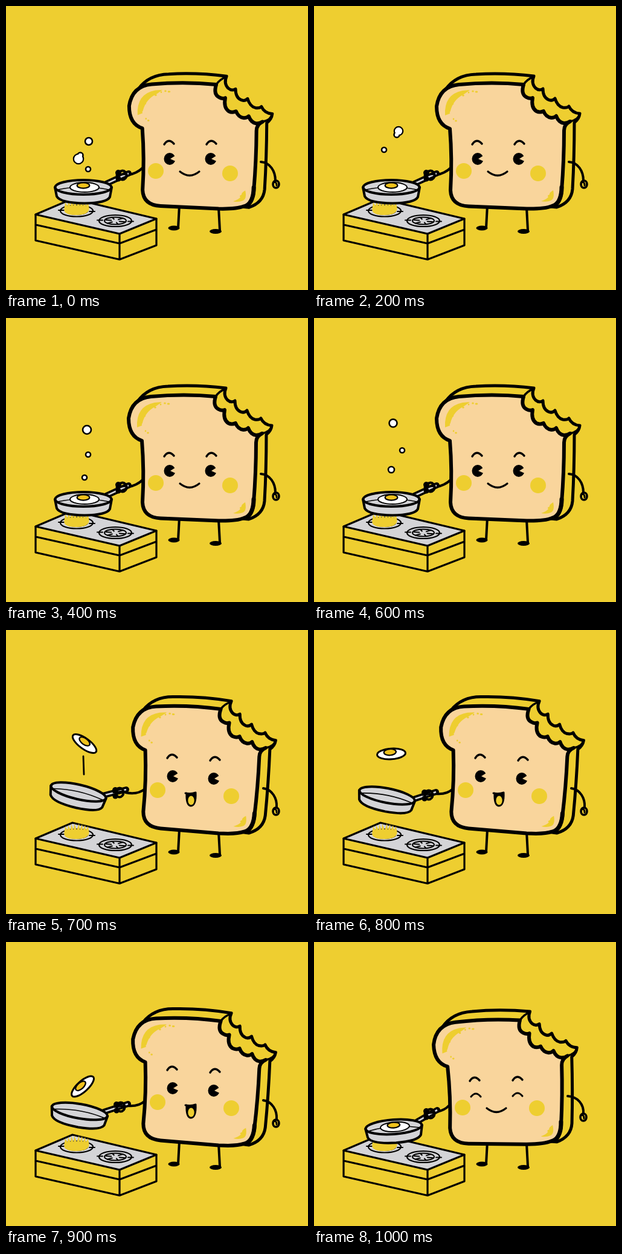
Write an HTML page that moves like this. It is 500x470 px and loops after 1.1 s.

```html
<!DOCTYPE html>
<html lang="en">
<head>
<meta charset="utf-8">
<title>Toast frying an egg</title>
<style>
  html, body { margin: 0; width: 100%; height: 100%; overflow: hidden; background: #eece30; }
  svg { display: block; width: 100%; height: 100%; }
  .line { fill: none; stroke: #000; stroke-linecap: round; stroke-linejoin: round; }
</style>
</head>
<body>
<svg id="stage" viewBox="0 0 500 470"></svg>
<script>
const YELLOW = '#eece30', BREAD = '#f9d59c', GREY = '#d4d4d7', YOLK = '#efc21c';
const LOOP = 1100;

const line = (d, w = 4, fill = 'none') =>
  `<path class="line" d="${d}" stroke-width="${w}" style="fill:${fill}"/>`;
const shape = (d, fill) => `<path d="${d}" fill="${fill}"/>`;
const oval = (x, y, rx, ry, fill, w = 0) =>
  `<ellipse cx="${x}" cy="${y}" rx="${rx}" ry="${ry}" fill="${fill}"` +
  (w ? ` stroke="#000" stroke-width="${w}"/>` : '/>');
const group = (transform, content) => `<g transform="${transform}">${content}</g>`;
const at = (x, y, r = 0) => `translate(${x} ${y}) rotate(${r})`;

// Poses: body tilt, face parts, pan position and tilt, handle, arms.
const idle = {
  tilt: 0, eyes: [[271, 253], [339, 253]], brows: [[270, 225], [340, 225]],
  cheeks: [[248, 273], [371, 277]], mouth: [304, 274], look: 'open',
  pan: [128, 300, 0], handle: [166, 294, 203, 277], hand: [190, 280],
  arm: 'M201 280 Q217 277 226 268',
  armR: 'M422 258 C437 259 446 273 446 289', fist: [447, 295]
};
const toss = {
  tilt: 2.4, eyes: [[276, 242], [344, 246]], brows: [[275, 208], [346, 212]],
  cheeks: [[251, 265], [373, 275]], mouth: [306, 270], look: 'happy',
  pan: [120, 268, 13], handle: [160, 274, 199, 264], hand: [185, 269],
  arm: 'M198 269 Q218 273 230 263',
  armR: 'M426 262 C441 264 449 279 448 293', fist: [447, 300]
};
const ready = {
  ...toss, pan: [122, 280, 10], handle: [162, 281, 202, 268], hand: [187, 273],
  arm: 'M201 271 Q219 273 230 263'
};
const smile = {
  tilt: -1.7, eyes: [[268, 253], [337, 252]], brows: [[266, 226], [337, 225]],
  cheeks: [[246, 274], [369, 275]], mouth: [302, 275], look: 'closed',
  pan: [132, 306, -4], handle: [171, 297, 204, 278], hand: [190, 284],
  arm: 'M204 281 Q217 278 223 271',
  armR: 'M420 255 C437 256 447 269 446 284', fist: [446, 290]
};

// Bubbles are [x, y, radius, bump direction].
const steps = [
  { t: 0, pose: { ...idle, tilt: .3 }, bubbles: [[137, 224, 6], [120, 253, 8, 1], [136, 270, 4]] },
  { t: 200, pose: idle, bubbles: [[140, 207, 7, -1], [116, 238, 4]] },
  { t: 300, pose: idle, bubbles: [[138, 196, 7], [126, 232, 4]] },
  { t: 400, pose: idle, bubbles: [[134, 185, 7], [136, 226, 4], [130, 264, 4]] },
  { t: 600, pose: idle, bubbles: [[131, 174, 6.5], [146, 219, 4], [128, 251, 5]] },
  { t: 700, pose: toss, egg: [130, 188, 36], trail: true },
  { t: 800, pose: { ...ready, pan: [121, 274, 11] }, egg: [128, 205, -4] },
  { t: 900, pose: ready, egg: [127, 239, -42] },
  { t: 1000, pose: smile }
];

const legs = () =>
  line('M287 330 L285 367') + oval(278, 367.5, 9.5, 4, '#000') +
  line('M352 334 L354 371') + oval(347, 373, 10, 4, '#000');

function burner(x, y) {
  let ticks = '';
  for (const a of [.3, 1.3, 2.4, 3.4, 4.4, 5.5]) {
    const c = Math.cos(a), s = Math.sin(a);
    ticks += line(`M${x + 7 * c} ${y + 3 * s} L${x + 17 * c} ${y + 6 * s}`, 2);
  }
  return oval(x, y, 27, 9.5, 'none', 2.2) + oval(x, y, 18, 6, 'none', 2) + ticks +
    line(`M${x - 30} ${y - 1} h9 M${x + 21} ${y + 1} h9`, 2);
}

function flame() {
  const n = 8;
  let d = 'M97 332';
  for (let i = 0; i < n; i++) {
    const x = 97 + i * 5;
    const peak = 326 - 6 * Math.sin((i + .5) / n * Math.PI);
    d += ` L${x + (i < n / 2 ? 1 : 4)} ${peak} L${x + 5} 331`;
  }
  return shape(d + ' Q141 346 116 346 Q92 346 97 332Z', YELLOW);
}

const stove = () =>
  shape('M49 345 L188 377 L249 352 V396 L188 419 L49 388Z', YELLOW) +
  line('M49 345 L110 319 L249 352 L188 377Z', 3.2, GREY) +
  line('M49 345 V388 L188 419.5 L249 396 V352 M188 377 V419 M49 362 L188 393 L249 370', 3.2) +
  burner(117, 339) + burner(181, 355.5) + flame();

function face(p) {
  const [[lx, ly], [rx, ry]] = p.eyes;
  const eye = (x, y) => p.look === 'closed'
    ? line(`M${x - 8} ${y + 3} Q${x} ${y - 7} ${x + 8} ${y + 3}`, 3)
    : oval(x, y, 9.5, 10, '#000') +
      shape(`M${x + 1} ${y} L${x + 12} ${y - 7} V${y + 5}Z`, BREAD);
  const brow = ([x, y]) => line(`M${x - 8} ${y + 4} Q${x - 1} ${y - 7} ${x + 8} ${y + 3}`, 3.4);
  const [mx, my] = p.mouth;
  const mouth = p.look === 'happy'
    ? line(`M${mx - 9} ${my} Q${mx} ${my + 2} ${mx + 8} ${my - 1} Q${mx + 9} ${my + 20} ${mx} ${my + 21} Q${mx - 8} ${my + 20} ${mx - 7} ${my}Z`, 3, '#000') +
      oval(mx + .5, my + 12, 5.2, 7.6, YELLOW)
    : line(`M${mx - 16} ${my} Q${mx} ${my + 13} ${mx + 16} ${my}`, 3.2);
  return p.cheeks.map(([x, y]) => oval(x, y, 13, 13, YELLOW)).join('') +
    eye(lx, ly) + eye(rx, ry) + p.brows.map(brow).join('') + mouth;
}

function bread(tilt) {
  const backBite = 'Q359 128 367 136 Q373 141 379 137 Q379 151 388 155 Q394 158 399 153 Q403 166 412 168 Q419 169 422 166 Q427 177 440 178';
  const frontBite = 'Q342 146 352 151 Q357 154 362 152 Q359 168 368 174 Q374 177 380 174 Q384 184 393 185 Q398 185 401 182 Q405 193 414 194 Q420 194 424 191';
  const back = `M218 138 Q235 114 268 113 Q315 110 364 116 ${backBite} Q439 187 431 193 Q431 250 428 303 Q426 325 402 333 L260 320 V150Z`;
  const front = `M347 130 ${frontBite} Q414 196 414 206 Q414 255 410 305 Q408 327 394 331 Q382 336 352 335.5 L256 331.5 Q227 330 226 305 Q229 253 225 203 Q203 196 203 166 Q208 133 240 130 Q295 125 347 130Z`;
  const marks =
    shape('M217 181 Q215 146 246 140 L258 139 Q249 146 243 149 Q228 159 225 178Z', YELLOW) +
    [[233, 155], [238, 157], [229, 162], [231, 187], [235, 190], [228, 183], [256, 143], [263, 141], [269, 142], [226, 176], [247, 148]]
      .map(([x, y], i) => oval(x, y, 1.3 + i % 3 * .5, 1.5, i % 4 == 1 ? BREAD : YELLOW)).join('') +
    shape('M396 305 Q399 319 392 322 Q385 325 376 323 Q385 320 388 316 Q385 314 390 312 Q389 309 396 305Z', YELLOW);
  return group(`rotate(${tilt} 330 335)`,
    line(back, 5, YELLOW) + line(front, 6, BREAD) +
    line('M364 117 Q353 121 347 130 M440 178 Q438 188 424 191', 3.5) +
    line('M410 300 Q410 322 398 331', 7) + marks);
}

const fist = ([x, y]) =>
  oval(x, y, 5, 6, YELLOW, 3.6) + line(`M${x - 4} ${y - 3} Q${x + 1} ${y - 5} ${x + 1} ${y + 2}`, 3);

function handle([x1, y1, x2, y2]) {
  const d = `M${x1} ${y1} L${x2} ${y2}`;
  return line(d, 10) + `<path d="${d}" stroke="${GREY}" stroke-width="2.6"/>`;
}

const grip = ([x, y]) =>
  oval(x - 4, y - 4, 5, 5, '#000') + oval(x + 3, y, 6.5, 7.5, 'none', 4) +
  oval(x - 4, y + 6, 4.5, 4.5, '#000') + line(`M${x - 7} ${y} L${x + 9} ${y - 2}`, 3);

const friedEgg = (rx, ry, w) =>
  oval(0, 0, rx, ry, '#fff', w) + oval(-2, -3, rx * .43, ry * .58, YOLK, 2.2);

function pan([x, y, r], hasEgg) {
  return group(at(x, y, r),
    line('M-47 0 L-44 15 Q-38 26 2 26.5 Q39 26 44 16 L47 0Z', 4, GREY) +
    oval(0, 0, 46.5, 12, GREY, 4) +
    line('M-42 4 Q0 -5 42 4', 1.6) +
    (hasEgg ? group(at(2, 0), friedEgg(24, 8, 2)) : ''));
}

function bubble([x, y, r, bump]) {
  const base = oval(x, y, r, r, '#fff', 2.6);
  if (!bump) return base;
  const bx = x + bump * 3, by = y - bump * 6;
  return base + oval(bx, by, 4.5, 4.5, '#fff', 2.6) + oval(x, y, r - 1, r - 1, '#fff');
}

function scene({ pose, bubbles = [], egg, trail }) {
  return `<rect width="500" height="470" fill="${YELLOW}"/>` +
    legs() + bread(pose.tilt) + face(pose) +
    line(pose.armR, 4) + fist(pose.fist) +
    stove() + line(pose.arm, 4) +
    handle(pose.handle) + pan(pose.pan, !egg) + grip(pose.hand) +
    bubbles.map(bubble).join('') +
    (trail ? line('M128 209 L129 239', 2.8) : '') +
    (egg ? group(at(...egg), friedEgg(23.5, 8.8, 3)) : '');
}

const stage = document.getElementById('stage');
let shown;
function draw(now) {
  const t = now % LOOP;
  const step = steps.findLast(s => s.t <= t);
  if (step !== shown) {
    stage.innerHTML = scene(step);
    shown = step;
  }
}

const start = performance.now();
function tick() {
  draw(performance.now() - start);
  requestAnimationFrame(tick);
}
tick();
</script>
</body>
</html>
```
